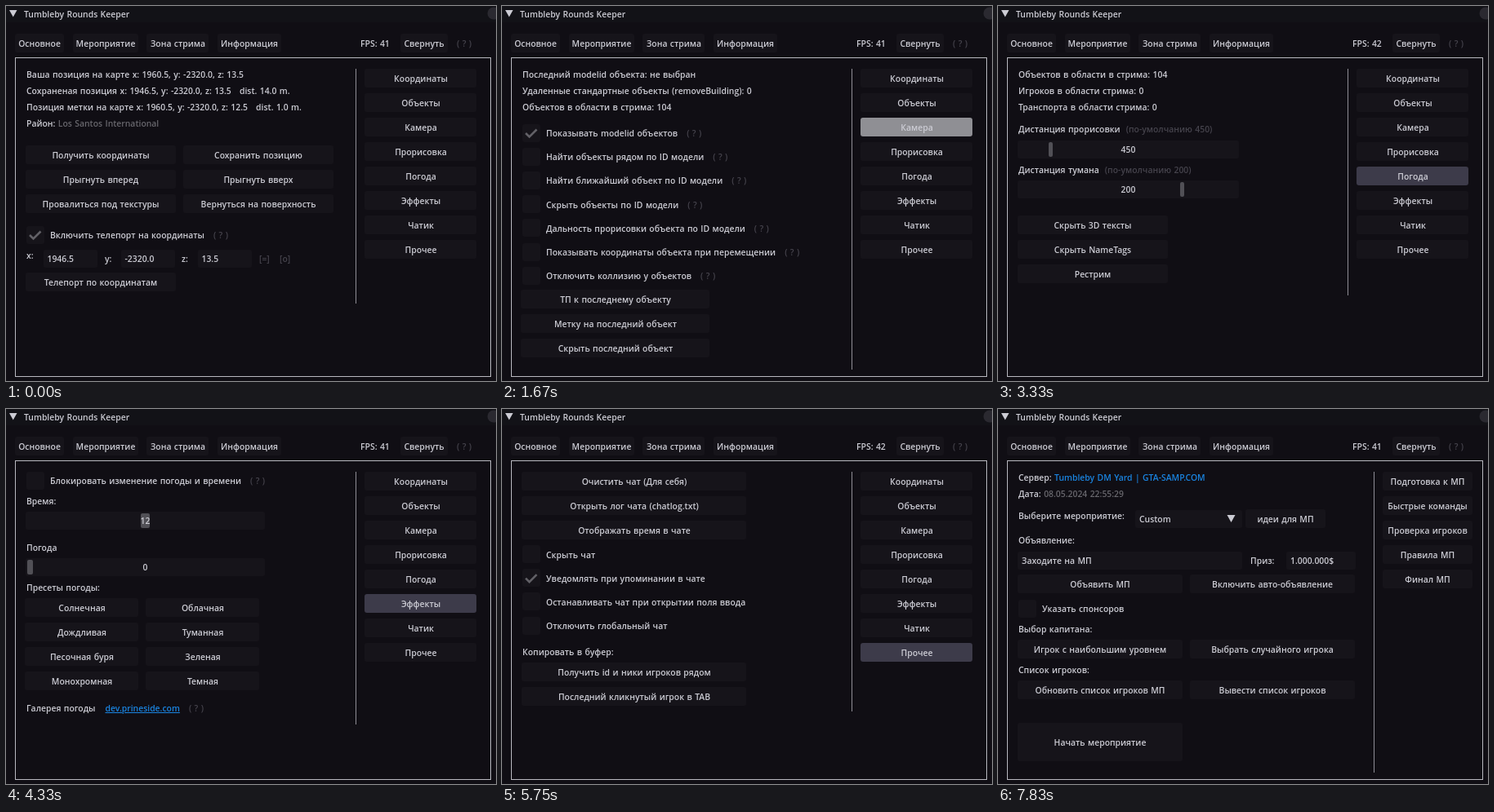
Recreate the animation shown at these times as an HTML page. Size 600 by 460 pixels, loop 8 s.

```html
<!DOCTYPE html>
<html lang="ru">
<head>
<meta charset="utf-8">
<style>
  html, body { margin: 0; width: 100%; height: 100%; overflow: hidden; background: #100e14; }
  svg { display: block; width: 600px; height: 460px; }
  text { font: 600 10.4px "Open Sans", "Noto Sans", sans-serif; word-spacing: .7px; fill: #ccccd4; white-space: pre; }
  .frame, .btn rect { fill: #16141a; }
  .btn text { text-anchor: middle; }
  .btn.hover rect { fill: #3d3b4a; }
  .btn.press rect { fill: #8f8f94; }
  .dim { fill: #45434c; }
  .soft { fill: #68676d; }
  .link { fill: #1a84e0; }
  .grab { fill: #515056; }
  .check { fill: none; stroke: #626167; stroke-width: 2.6; }
  .arrow { fill: #ccccd4; }
  .line { fill: none; stroke: #b9b9c0; }
</style>
</head>
<body>
<svg id="stage" viewBox="0 0 600 460"></svg>
<script>
const HINT = '( ? )';
const span = (cls, s, dx = 0) => `<tspan class="${cls}" dx="${dx}">${s}</tspan>`;
const hint = () => span('dim', HINT, 11);

// Every y below is the vertical centre of its row.
const text = (x, y, s, cls = '') => `<text x="${x}" y="${y + 4}" class="${cls}">${s}</text>`;
const rect = (x, y, w, h = 22, cls = 'frame', r = 3) =>
  `<rect x="${Math.floor(x)}" y="${Math.floor(y - h / 2)}" width="${w}" height="${h}" rx="${r}" class="${cls}"/>`;
const btn = (cx, y, w, s, id = '', h = 23) =>
  `<g class="btn" data-id="${id}">${rect(cx - w / 2, y, w, h, '')}${text(cx, y, s)}</g>`;
const lines = (...rows) => rows.map((s, i) => text(25, 84 + 20 * i, s)).join('');
const column = (cx, y, w, labels) =>
  labels.map((s, i) => btn(cx, y + 30 * i, w, s, s)).join('');
const pairs = (x1, x2, y, w, rows) =>
  rows.map(([a, b], i) => btn(x1, y + 30 * i, w, a) + btn(x2, y + 30 * i, w, b)).join('');
const check = (y, s, on = false) => rect(25, y, 22) + text(54, y, s) +
  (on ? `<path class="check" d="M29 ${y}l4.500 4.500l9 -9"/>` : '');
const checks = (y, rows, active = -1) =>
  rows.map((s, i) => check(y + 29.2 * i, s, i === active)).join('');
const input = (x, y, w, s) => rect(x, y, w) + text(x + 4.5, y, s);
const down = (x, y) => `<path class="arrow" d="M${x - 5} ${y - 4}h10l-5 9z"/>`;
const combo = (x, y, w, s) => input(x, y, w, s) + down(x + w - 14, y - 1);
const slider = (y, w, value, grabX, grabW) => rect(24, y, w) +
  rect(grabX, y, grabW, 18, 'grab', 2) +
  `<text x="${24 + w / 2}" y="${y + 4}" text-anchor="middle">${value}</text>`;
const divider = (x, end) => `<path class="line" opacity=".75" d="M${x + .5} 77V${end}"/>`;

const SIDE = ['Координаты', 'Объекты', 'Камера', 'Прорисовка', 'Погода', 'Эффекты', 'Чатик', 'Прочее'];
const EVENT_SIDE = ['Подготовка к МП', 'Быстрые команды', 'Проверка игроков', 'Правила МП', 'Финал МП'];

const pages = {
  Координаты: divider(428, 365) +
    lines('Ваша позиция на карте x: 1960.5, y: -2320.0, z: 13.5',
      'Сохраненая позиция x: 1946.5, y: -2320.0, z: 13.5   dist. 14.0 m.',
      'Позиция метки на карте x: 1960.5, y: -2320.0, z: 12.5   dist. 1.0 m.',
      'Район: ' + span('soft', 'Los Santos International')) +
    pairs(116, 309, 183, 184, [['Получить координаты', 'Сохранить позицию'],
      ['Прыгнуть вперед', 'Прыгнуть вверх'],
      ['Провалиться под текстуры', 'Вернуться на поверхность']]) +
    check(281, 'Включить телепорт на координаты' + hint(), true) +
    text(25, 306, 'x:') + input(46, 310, 66, '1946.5') +
    text(121, 310, 'y:') + input(141, 310, 66, '-2320.0') +
    text(215, 310, 'z:') + input(235, 310, 66, '13.5') +
    text(310, 310, '[=]', 'dim') + text(335, 310, '[o]', 'dim') +
    btn(116, 339, 184, 'Телепорт по координатам'),

  Объекты: divider(428, 446) +
    lines('Последний modelid объекта: не выбран',
      'Удаленные стандартные объекты (removeBuilding): 0',
      'Объектов в области в стрима: 104') +
    checks(156, ['Показывать modelid объектов', 'Найти объекты рядом по ID модели',
      'Найти ближайший объект по ID модели', 'Скрыть объекты по ID модели',
      'Дальность прорисовки объекта по ID модели',
      'Показывать координаты объекта при перемещении',
      'Отключить коллизию у объектов'].map(s => s + hint()), 0) +
    column(139, 360, 231, ['ТП к последнему объекту', 'Метку на последний объект', 'Скрыть последний объект']),

  Камера: divider(428, 401) +
    lines('Позиция камеры x: 1960.5, y: -2324.0, z: 15.0') +
    checks(118, ['Зафиксировать камеру', 'Свободная камера'].map(s => s + hint())) +
    pairs(116, 309, 183, 184, [['Камера вперед', 'Камера назад'], ['Вернуть камеру', 'Сохранить камеру']]),

  Прорисовка: divider(428, 355) +
    lines('Объектов в области в стрима: 104', 'Игроков в области стрима: 0',
      'Транспорта в области стрима: 0') +
    text(25, 151, 'Дистанция прорисовки' + span('dim', '(по-умолчанию 450)', 7)) +
    slider(176, 271, 450, 62, 5) +
    text(25, 201, 'Дистанция тумана' + span('dim', '(по-умолчанию 200)', 7)) +
    slider(225, 271, 200, 223.5, 5) +
    column(116, 269, 184, ['Скрыть 3D тексты', 'Скрыть NameTags', 'Рестрим']),

  Погода: divider(428, 387) +
    check(88, 'Блокировать изменение погоды и времени' + hint()) +
    text(25, 113, 'Время:') + slider(137, 293, 12, 165, 11) +
    text(25, 170, 'Погода') + slider(194, 293, 0, 26, 7) +
    text(25, 219, 'Пресеты погоды:') +
    pairs(93, 241, 243.5, 139, [['Солнечная', 'Облачная'], ['Дождливая', 'Туманная'],
      ['Песочная буря', 'Зеленая'], ['Монохромная', 'Темная']]) +
    text(25, 367, 'Галерея погоды') +
    text(121.5, 367, '<tspan class="link" text-decoration="underline">dev.prineside.com</tspan>' + hint()),

  Эффекты: divider(428, 371) +
    checks(88, ['Отключить эффекты', 'Отключить дождь', 'Отключить туман'].map(s => s + hint())) +
    column(116, 183, 184, ['Сбросить эффекты']),

  Чатик: divider(428, 371) +
    column(162, 88.5, 275, ['Очистить чат (Для себя)', 'Открыть лог чата (chatlog.txt)', 'Отображать время в чате']) +
    checks(178.5, ['Скрыть чат', 'Уведомлять при упоминании в чате',
      'Останавливать чат при открытии поля ввода', 'Отключить глобальный чат'], 1) +
    text(25, 298, 'Копировать в буфер:') +
    column(162, 323, 275, ['Получить id и ники игроков рядом', 'Последний кликнутый игрок в TAB']),

  Прочее: divider(428, 455) +
    lines('Текущий Gamestate: Connected') +
    combo(203, 88, 113, 'None') + btn(351, 88, 60, 'Сменить') +
    rect(24, 117.5, 372) + '<path class="arrow" d="M27 112.5l9 5l-9 5z"/>' +
    text(46, 117.5, 'Логгировать в консоли:') +
    checks(146.5, ['Отображать ID текстдравов', 'Скрыть все текстдравы']) +
    btn(116, 205, 184, 'Скрыть диалог') +
    text(25, 230, 'Последний ID диалога: 500') + text(25, 258, 'В наблюдении: Нет') +
    pairs(116, 309, 282.5, 184, [['Выйти из спектатора', 'Войти в спектатор'],
      ['Заспавниться', 'Респавн (Эмуляция)'], ['Заморозить на позиции', 'Разморозить']]) +
    text(25, 376, 'Стандартные логи:') +
    combo(24.5, 400, 139, 'moonloader.log') + btn(241, 400, 139, 'показать') +
    pairs(93, 241, 438, 139, [['Выгрузить скрипт', 'Реконнект (5 сек)']]),

  Мероприятие: divider(460, 446) +
    lines('Сервер: ' + span('link', 'Tumbleby DM Yard | GTA-SAMP.COM'),
      'Дата: <tspan class="soft" id="date"></tspan>') +
    text(25, 131, 'Выберите мероприятие:') + combo(168.5, 135, 131, 'Custom') +
    btn(352, 135, 98, 'идеи для МП') +
    text(25, 161, 'Объявление:') + input(24.5, 186, 275, 'Заходите на МП') +
    text(309, 186, 'Приз:') + input(353.5, 186, 85, '1.000.000$') +
    pairs(125, 336, 215, 202, [['Объявить МП', 'Включить авто-объявление']]) +
    check(245, 'Указать спонсоров') +
    text(25, 270, 'Выбор капитана:') +
    pairs(125, 336, 295, 202, [['Игрок с наибольшим уровнем', 'Выбрать случайного игрока']]) +
    text(25, 320, 'Список игроков:') +
    pairs(125, 336, 345, 202, [['Обновить список игроков МП', 'Вывести список игроков']]) +
    btn(125, 408.5, 202, 'Начать мероприятие', '', 47) +
    column(526, 88.5, 110, EVENT_SIDE)
};

const stage = document.getElementById('stage');
stage.innerHTML =
  '<rect width="600" height="20" fill="#121217"/>' +
  '<path class="arrow" d="M4 5h9.500l-4.750 8.500z"/>' +
  text(22, 10, 'Tumbleby Rounds Keeper') +
  '<circle cx="597" cy="9" r="7.500" fill="#2a2930"/>' +
  btn(41, 45.5, 60, 'Основное') + btn(122, 45.5, 80, 'Мероприятие', 'Мероприятие') +
  btn(210.5, 45.5, 76, 'Зона стрима') + btn(298, 45.5, 78, 'Информация') +
  text(434, 45.5, 'FPS: <tspan id="fps"></tspan>') +
  btn(512, 45.5, 58, 'Свернуть') + text(552, 45.5, HINT, 'dim') +
  '<rect x="11.500" y="63.500" width="582" height="391" class="line"/>' +
  `<g id="side">${column(508, 88.5, 137, SIDE)}</g>` +
  Object.entries(pages).map(([name, body]) => `<g data-page="${name}">${body}</g>`).join('');

const fps = document.getElementById('fps');
const date = document.getElementById('date');
const side = document.getElementById('side');
const pageNodes = stage.querySelectorAll('[data-page]');
const menu = [...stage.querySelectorAll('.btn')]
  .filter(b => b.dataset.id && (b.parentNode === stage || b.parentNode === side));

// Pointer visits: button, enter, press, release, leave (ms). A release opens the page.
const visits = [
  ['Объекты', 420, 920, 1000, 1250],
  ['Камера', 1330, 1670, 1750, 2170],
  ['Прорисовка', 2420, 2580, 2670, 2830],
  ['Погода', 3250, 3580, 3670, 3830],
  ['Эффекты', 4000, 4500, 4580, 4750],
  ['Чатик', 5000, 5170, 5250, 5420],
  ['Прочее', 5500, 6000, 6080, 6330],
  ['Мероприятие', 6670, 6920, 7000, 7170]
];
const fpsSteps = [[0, 41], [170, 42], [1170, 41], [3170, 42], [4250, 41], [5250, 42], [6170, 41]];

function draw(now) {
  const t = now % 8000;
  let page = 'Координаты', active = '', state = '';
  for (const [name, enter, press, release, leave] of visits) {
    if (t >= release) page = name;
    if (t >= enter && t < leave) {
      active = name;
      state = t >= press && t < release ? ' press' : ' hover';
    }
  }
  for (const node of pageNodes) node.style.display = node.dataset.page === page ? '' : 'none';
  side.style.display = page === 'Мероприятие' ? 'none' : '';
  for (const b of menu) b.setAttribute('class', 'btn' + (b.dataset.id === active ? state : ''));
  fps.textContent = fpsSteps.filter(([at]) => t >= at).pop()[1];
  date.textContent = '08.05.2024 22:55:' + (t < 7500 ? 28 : 29);
  requestAnimationFrame(draw);
}
requestAnimationFrame(draw);
</script>
</body>
</html>
```
